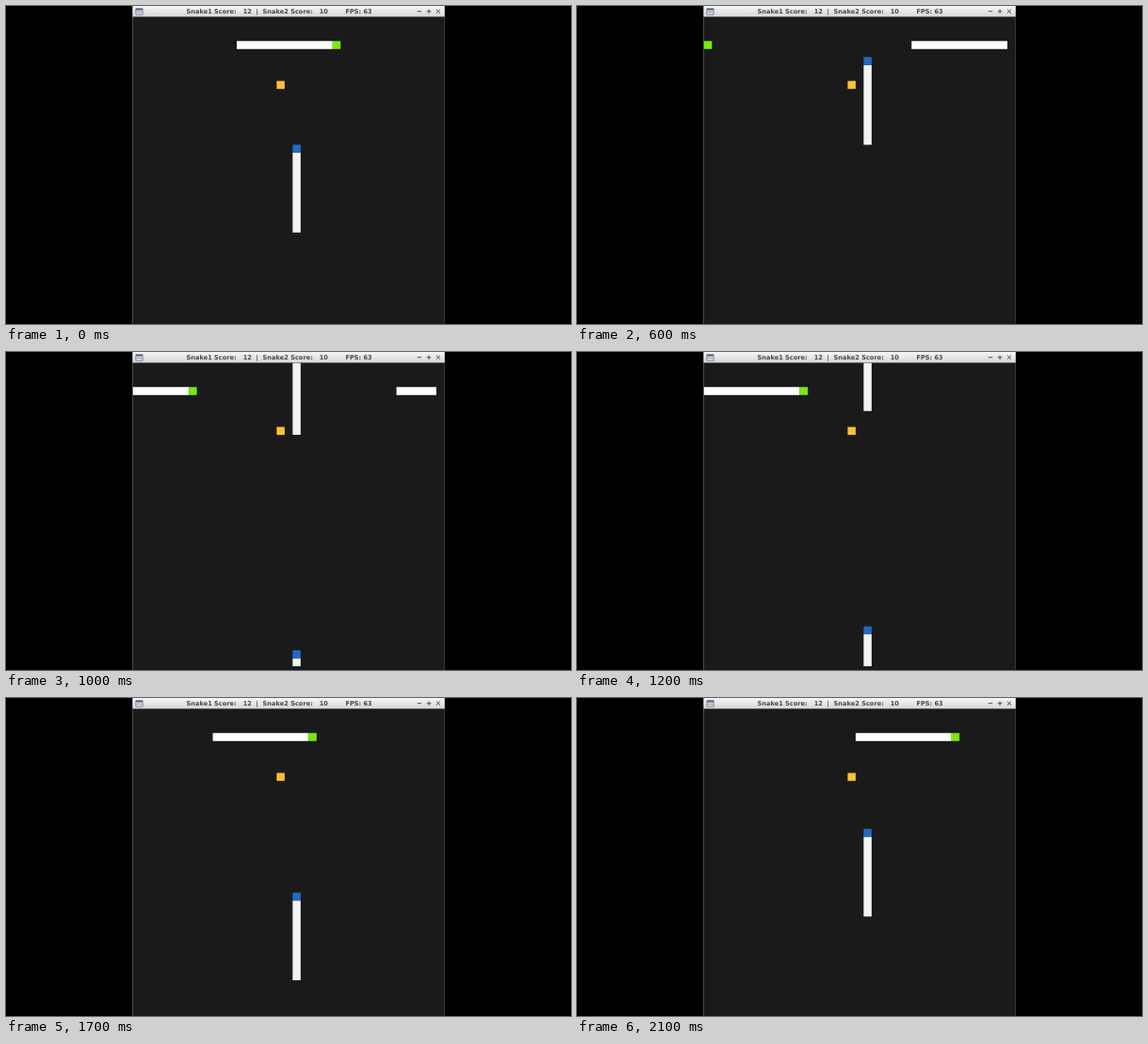
An HTML page that plays this animation: 600x338 px, repeating every 2200 ms.

```html
<!DOCTYPE html>
<html lang="en">
<head>
<meta charset="utf-8">
<title>Two snakes</title>
<style>
html, body { margin: 0; width: 100%; height: 100%; overflow: hidden; background: #000; }
svg { display: block; }
text {
  font: bold 6.64px "DejaVu Sans", sans-serif;
  fill: #484848;
  white-space: pre;
  text-rendering: geometricPrecision;
}
</style>
</head>
<body>
<svg width="600" height="338" viewBox="0 0 600 338">
  <defs>
    <linearGradient id="bar" x2="0" y2="1">
      <stop stop-color="#f6f6f6"/>
      <stop offset="1" stop-color="#d6d6d6"/>
    </linearGradient>
  </defs>
  <rect x="134" width="332" height="338" fill="#555"/>
  <rect x="134.8" y="11" width="330.7" height="327" fill="#1b1a1b"/>
  <rect x="134.5" width="331.3" height="11.4" fill="url(#bar)"/>
  <!-- window icon and buttons -->
  <rect x="137.5" y="2.3" width="8" height="7.2" rx=".6" fill="#5d6c85"/>
  <rect x="138.2" y="4.6" width="6.6" height="4.2" fill="#d5dbe4"/>
  <path d="M138.2 6.5h6.6" stroke="#8795ad" stroke-width=".7"/>
  <path d="M436.8 5.7h4.4M446.8 5.7h4.6M449.1 3.4v4.6M456.9 3.6l4.1 4.1M461 3.6l-4.1 4.1" stroke="#505050"/>
  <text x="191.5" y="8">Snake1 Score:   12  |  Snake2 Score:   10        FPS: 63</text>
  <path id="food" fill="#fcc12d"/>
  <path id="body1" fill="#fff"/>
  <path id="head1" fill="#76ee00"/>
  <path id="body2" fill="#f2f2f2"/>
  <path id="head2" fill="#1c6cc4"/>
</svg>
<script>
const CELL = 8.48, LEFT = 134.8, TOP = 11.8, GRID = 38, FRAME = 100, LOOP = 2200;

// Cells moved in each successive tick
const steps1 = "222223122232222223222";
const steps2 = "221222212221222222222";

const wrap = n => (n % GRID + GRID) % GRID;
const square = (col, row) =>
  `M${LEFT + col * CELL} ${TOP + row * CELL}h${CELL}v${CELL}h${-CELL}z`;
const draw = (id, d) => document.getElementById(id).setAttribute("d", d);
const travelled = (steps, tick) =>
  [...steps.slice(0, tick)].reduce((sum, s) => sum + +s, 0);

// cellAt(i) gives the square i places behind the head
function drawSnake(n, length, cellAt) {
  const cells = Array.from({ length }, (_, i) => cellAt(i));
  draw("head" + n, cells[0]);
  draw("body" + n, cells.slice(1).join(""));
}

function render(time) {
  const tick = Math.floor(time % LOOP / FRAME);
  const col = 25 + travelled(steps1, tick);
  const row = 16 - travelled(steps2, tick);
  drawSnake(1, 13, i => square(wrap(col - i), 3));
  drawSnake(2, 11, i => square(20, wrap(row + i)));
}

draw("food", square(18, 8));
const start = performance.now();
function loop() {
  render(performance.now() - start);
  requestAnimationFrame(loop);
}
loop();
</script>
</body>
</html>
```
